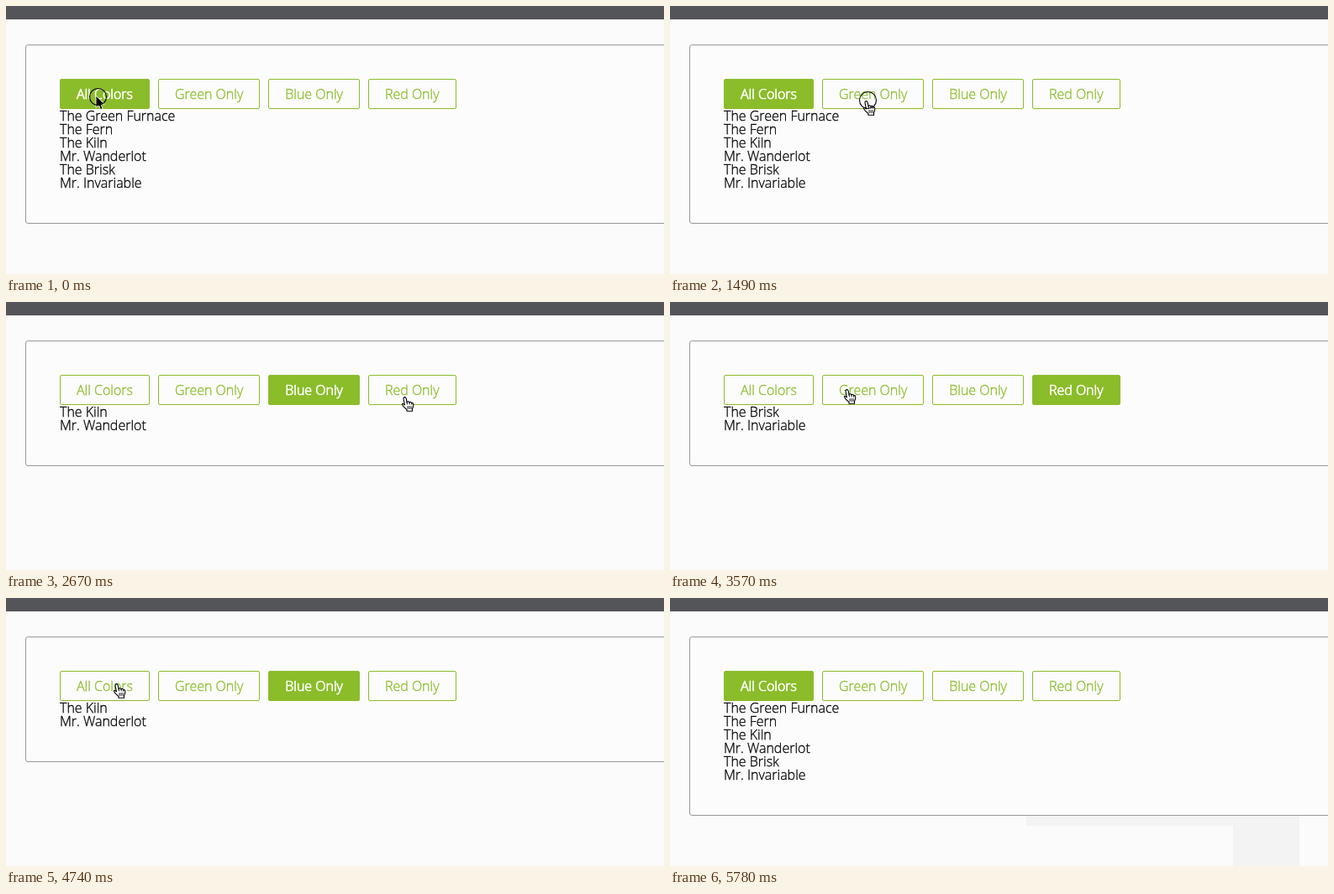
Animation of 783 by 320 pixels, one loop 6.02 s. Source, as an HTML page:

```html
<!DOCTYPE html>
<html lang="en">
<head>
<meta charset="utf-8">
<title>Colour filter</title>
<style>
html, body { margin: 0; width: 100%; height: 100%; overflow: hidden; }
body { position: relative; background: #fbfbfb; font: 300 16px/16px "Open Sans", sans-serif; color: #000; }
header { position: absolute; left: 0; top: 0; width: 783px; height: 16px; background: #545559; }
.shade { position: absolute; background: #f3f3f3; visibility: hidden; }
#wide { left: 424px; top: 260px; width: 325px; height: 12px; }
#tall { left: 670px; top: 272px; width: 79px; height: 48px; }
#panel { position: absolute; box-sizing: border-box; left: 23px; top: 46px; width: 800px;
  border: 1px solid #999; border-radius: 3px; background: #fcfcfc; }
#tabs { position: absolute; left: 64px; top: 87px; display: flex; gap: 10px; }
.tab { box-sizing: border-box; height: 36px; padding: 0 19px; line-height: 34px; white-space: nowrap;
  border: 1px solid #8bbc2a; border-radius: 2px; color: #8bbc2a; -webkit-text-stroke: .35px; }
.tab.on { background: #8bbc2a; color: #fff; -webkit-text-stroke: .7px; }
#list { position: absolute; left: 64px; top: 123px; white-space: nowrap; -webkit-text-stroke: .3px; }
svg { position: absolute; left: 0; top: 0; }
</style>
</head>
<body>
<header></header>
<div class="shade" id="wide"></div>
<div class="shade" id="tall"></div>
<div id="panel"></div>
<div id="tabs"></div>
<div id="list"></div>
<svg width="783" height="320">
  <g id="cursor">
    <path id="arrow" transform="translate(-2.5 -1.5)" d="M0 0V14.2L3.3 11.2L5.6 16.6L8 15.6L5.8 10.3H10.2Z"
      fill="#000" stroke="#fff" stroke-width=".9"/>
    <g id="hand" transform="translate(-6 .5)" stroke="#000" stroke-linecap="round">
      <path fill="#fff" stroke-width="1.1" d="M4 10.2L2.6 3Q2.3.8 3.8.6Q5.3.5 5.7 2.3L6.6 6.5Q7 5.6 8.2 5.7Q9.3 5.8 9.5 6.9Q10.2 6.1 11.2 6.5Q12.1 6.9 12.2 7.8Q13.2 7.2 14 8.2Q14.6 9.2 14 12L13 14.5V17.2H6.5V15.6L2.6 11.8Q.8 9.6.9 8.9Q1.7 7.9 3 9Z"/>
      <path fill="none" stroke-width=".9" d="M7.6 11.5V14.5M9.6 11.5V14.5M11.6 11.5V14.5M6.6 6.5L7 9M9.5 7L9.7 9M12.2 8V9.3"/>
    </g>
    <circle id="ring" r="10" fill="none" stroke="#000" stroke-width="1.1"/>
  </g>
</svg>
<script>
const LOOP = 6020, TICK = 148;
const $ = id => document.getElementById(id);

const labels = ["All Colors", "Green Only", "Blue Only", "Red Only"];
const names = ["The Green Furnace", "The Fern", "The Kiln", "Mr. Wanderlot", "The Brisk", "Mr. Invariable"];

// Where the pointer rests; arrive, click and leave are counted in ticks.
const stops = [
  { tab: 0, x: 109.5, y: 108.5, arrive: 0, click: 2, leave: 4 },
  { tab: 1, x: 235.5, y: 112.5, arrive: 10, click: 10, leave: 11 },
  { tab: 2, x: 341.5, y: 105.5, arrive: 15, click: 15, leave: 16 },
  { tab: 3, x: 476.5, y: 112.5, arrive: 18, click: 20, leave: 21 },
  { tab: 1, x: 212.5, y: 103.5, arrive: 24, click: 25, leave: 26 },
  { tab: 2, x: 352, y: 106, arrive: 29, click: 29, leave: 30 },
  { tab: 0, x: 133.5, y: 101.5, arrive: 32, click: 33, leave: 35 }
];
const exit = { x: 800, y: 300, arrive: 39 };

function fill(parent, texts, className) {
  return texts.map(text => {
    const el = document.createElement("div");
    el.className = className;
    el.textContent = text;
    return parent.appendChild(el);
  });
}
const tabEls = fill($("tabs"), labels, "tab");
const nameEls = fill($("list"), names, "name");

const show = (el, on) => { el.style.visibility = on ? "visible" : "hidden"; };
const ease = p => p * p * (3 - 2 * p);
const overTab = (x, y) => tabEls.some(el => {
  const box = el.getBoundingClientRect();
  return x >= box.left && x < box.right && y >= box.top && y < box.bottom;
});

function pointer(n) {
  const i = stops.findLastIndex(stop => stop.arrive <= n);
  const from = stops[i], to = stops[i + 1] || exit;
  const p = ease(Math.min(1, Math.max(0, (n - from.leave) / (to.arrive - from.leave))));
  return [from.x + (to.x - from.x) * p, from.y + (to.y - from.y) * p];
}

function choose(tab) {
  tabEls.forEach((el, i) => el.classList.toggle("on", i === tab));
  nameEls.forEach((el, i) => { el.hidden = tab > 0 && Math.floor(i / 2) !== tab - 1; });
  $("panel").style.height = 118 + 16 * (tab ? 2 : names.length) + "px";
}

function draw(n) {
  const [x, y] = pointer(n);
  const here = n < exit.arrive;
  const hand = n > stops[0].leave && overTab(x, y);
  const picked = stops.findLast(stop => stop.click < n) || stops[0];
  choose(picked.tab);
  $("cursor").setAttribute("transform", `translate(${x} ${y})`);
  show($("hand"), here && hand);
  show($("arrow"), here && !hand);
  show($("ring"), n === 0 || stops.some(stop => stop.click === n));
  show($("wide"), n >= exit.arrive - 1);
  show($("tall"), n >= exit.arrive);
}

const start = performance.now();
let last = -1;
function frame() {
  const n = Math.floor((performance.now() - start) % LOOP / TICK);
  if (n !== last) draw(last = n);
  requestAnimationFrame(frame);
}
frame();
</script>
</body>
</html>
```
